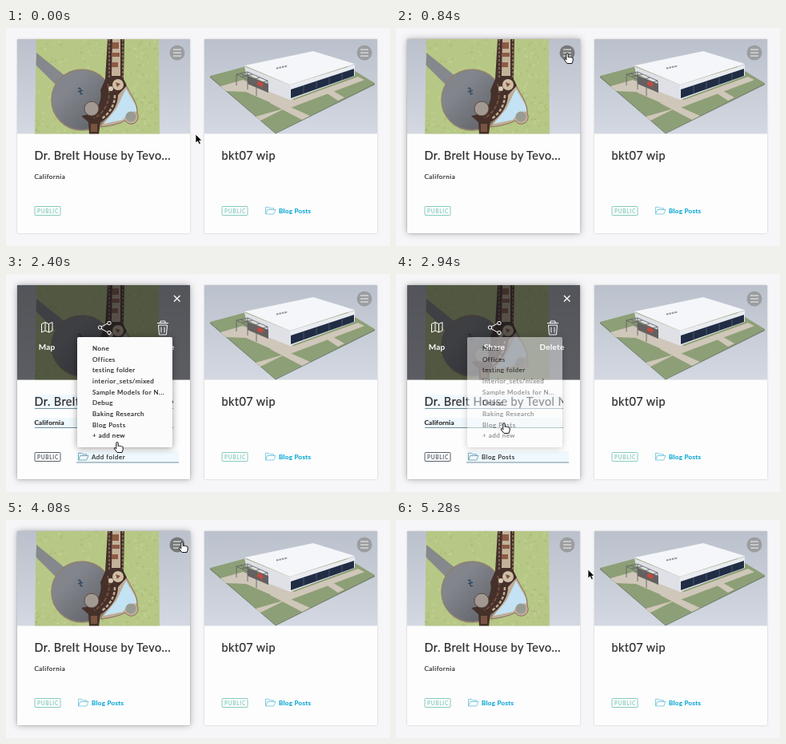
Animation of 480 by 273 pixels, one loop 5.34 s. Source, as an HTML page:

```html
<!DOCTYPE html>
<html lang="en">
<head>
<meta charset="utf-8">
<title>Project cards</title>
<style>
  html, body { margin: 0; width: 100%; height: 100%; overflow: hidden; background: #f6f6f8; }
  svg { display: block; }
  text { font: 8px Lato, "Open Sans", sans-serif; letter-spacing: .5px; fill: #2b2b2d; stroke: #2b2b2d; stroke-width: .2px; white-space: pre; }
  .title { font-size: 14.5px; letter-spacing: .4px; }
  .strong { font-weight: 700; letter-spacing: .3px; }
  .blue { fill: #12a9d6; stroke: #12a9d6; }
  .action { font-size: 10px; font-weight: 700; letter-spacing: .2px; fill: #fff; stroke: none; text-anchor: middle; }
  .tag text { font-size: 6.5px; font-weight: 700; letter-spacing: .7px; fill: currentColor; stroke: none; }
  .line { fill: none; stroke: currentColor; stroke-width: 1; }
  .card { fill: #fdfdfd; filter: drop-shadow(0 .5px 1px rgba(0,0,0,.2)); }
  .lift { fill: #fdfdfd; filter: drop-shadow(0 0 4.5px rgba(0,0,0,.3)); }
  .popup { fill: #fbfbfc; filter: drop-shadow(0 1px 4px rgba(0,0,0,.4)); }
  .field { fill: #eff8fd; }
</style>
</head>
<body>
<svg width="480" height="273" viewBox="0 0 480 273">
  <defs>
    <linearGradient id="sky" x2="0" y2="1">
      <stop stop-color="#bbc1cc"/><stop offset="1" stop-color="#d3d8e2"/>
    </linearGradient>
    <linearGradient id="slate" x2="1" y2="1">
      <stop offset=".3" stop-color="#82868c"/><stop offset=".8" stop-color="#65676d"/>
    </linearGradient>
    <clipPath id="lawn"><path d="M38 14H191L192 132.500H36Z"/></clipPath>
    <g id="folder" class="line" stroke-linejoin="round">
      <path d="M.5 9.500V.8H4.500L5.800 2.300H10.500V4M.5 9.500L2.800 4H13L10.700 9.500Z" stroke-width=".8"/>
    </g>
    <g id="tag" class="tag">
      <rect class="line" x=".5" y=".5" width="32" height="11" rx="1"/>
      <text x="3.500" y="8.500">PUBLIC</text>
    </g>
    <path id="bars" d="M-5-4H5M-5 0H5M-5 4H5" stroke="#f4f4f4" stroke-width="1.100"/>
  </defs>

  <!-- first card -->
  <rect class="card" x="14" y="14" width="216" height="243" rx="1"/>
  <rect id="lift" class="lift" x="14" y="14" width="216" height="243" rx="1"/>
  <rect x="14" y="14" width="216" height="118.500" fill="url(#sky)"/>
  <g clip-path="url(#lawn)">
    <rect x="36" y="14" width="156" height="119" fill="#b7c785"/>
    <g id="grass"></g>
    <path d="M38 31L74 60 62 71 37 46Z" fill="#85888c"/>
    <!-- pool and its terrace -->
    <path d="M136 80L151 73C157 86 165 94 164 107A8 8 0 1 1 149 116Q138 122 118 124L128 104Z" fill="#c0ad98" stroke="#836f60"/>
    <path d="M150 76C156 88 164 96 163 105 154 102 148 113 146 115L122 120 138 101Z" fill="#c3e2f3"/>
    <circle cx="156" cy="111" r="6.500" fill="#989b91"/>
    <!-- round court -->
    <circle cx="95" cy="90" r="38" fill="url(#slate)" stroke="#8f7f70" stroke-width="1.500"/>
    <path d="M90 76q3-2 3 1t3 1M90 80q3-2 3 1t3 1" fill="none" stroke="#2f4763" stroke-width="1.500"/>
    <!-- house -->
    <path d="M127 14H148L147 64 151 72 140 84C140 98 130 112 118 118L116 133H104L103 118 94 110C112 108 121 94 118 78L124 64Z" fill="#45302a"/>
    <path d="M133 14H143V60H132Z" fill="#c3b29a"/>
    <path d="M133 18h8v8h-8zM133 31h9v5h-9zM132 43h8v6h-8z" fill="#8e5a44"/>
    <path d="M129 14V62M146 14V62" stroke="#a88a70" stroke-width="1.200" stroke-dasharray="3 2"/>
    <path d="M127 70C133 88 124 106 110 113" fill="none" stroke="#72513f" stroke-width="2" stroke-dasharray="5 2"/>
    <path d="M136 84C136 98 128 108 119 114" fill="none" stroke="#c1ab92" stroke-width="2.500" stroke-dasharray="4 2"/>
    <circle cx="140" cy="71" r="7" fill="#cfbea5"/>
    <circle cx="131" cy="76" r="3" fill="#d8cbb6"/>
    <path d="M137 68l6 2-4 4z" fill="#81513c"/>
    <circle cx="107" cy="101" r="9" fill="#a29a92" stroke="#5d4b41"/>
    <path d="M106 120h8v10h-8z" fill="#795441"/>
  </g>
  <g id="view">
    <circle id="menu" cx="214" cy="31" r="9.500"/>
    <use href="#bars" x="214" y="31"/>
    <text class="title" x="35.500" y="165">Dr. Brelt House by Tevo...</text>
    <text x="35.500" y="188.500">California</text>
    <use href="#tag" x="35.500" y="223" color="#86cbbe"/>
    <g id="saved">
      <use href="#folder" x="90" y="223.500" color="#62c0dc"/>
      <text class="strong blue" x="107" y="231.500">Blog Posts</text>
    </g>
  </g>
  <g id="edit">
    <rect x="14" y="14" width="216" height="118.500" fill="#18181c" opacity=".64"/>
    <path d="M210 27l7.500 7.500m0-7.500L210 34.500" stroke="#fff" stroke-width="1.300"/>
    <g class="line" color="#fff" stroke-linejoin="round">
      <path d="M44.500 62.500l4.500-2 4.500 2 4.500-2V71l-4.500 2-4.500-2-4.500 2ZM49 60.500V71M53.500 62.500V73"/>
      <path d="M119 66l8-4M119 68.500l8 4.500"/>
      <circle cx="117.500" cy="67" r="2.200"/><circle cx="129" cy="61.500" r="2.200"/><circle cx="129" cy="73.500" r="2.200"/>
      <path d="M189 61.500H203M193 61V59H199V61M190.500 64L191.500 76H200.500L201.500 64ZM194 66.500V73.500M198 66.500V73.500"/>
    </g>
    <text class="action" x="51" y="95">Map</text>
    <text class="action" x="123" y="95">Share</text>
    <text class="action" x="195" y="95">Delete</text>
    <path class="field" d="M36 151H209V168H36ZM36 180H209V192H36ZM88 222H216V236H88Z"/>
    <path class="line" color="#6f8f9b" d="M36 168.500H209M36 192.500H209M88 236H216"/>
    <svg width="209" height="273"><text class="title" x="35.500" y="165">Dr. Brelt House by Tevol N</text></svg>
    <text class="strong" x="35.500" y="188.500">California</text>
    <use href="#tag" x="35.500" y="223" color="#56606b"/>
    <use href="#folder" x="90" y="223.500" color="#5f95a8"/>
    <text id="choice" x="107" y="231.500"></text>
  </g>
  <g id="popup">
    <rect class="popup" x="89" y="79" width="119" height="138" rx="2"/>
  </g>

  <!-- second card -->
  <rect class="card" x="248" y="14" width="216" height="243" rx="1"/>
  <rect x="248" y="14" width="216" height="118.500" fill="url(#sky)"/>
  <path d="M255 60L300 48 420 44 461 69 337 131Z" fill="#8d9f76"/>
  <path d="M255 60L337 131 461 69V71L337 132.500 255 62Z" fill="#76856a"/>
  <g fill="#cfc7b9">
    <path d="M268 73L296 65 360 90 440 61 448 65 350 102 300 80 275 79Z"/>
    <path d="M330 94L340 92 380 110 370 115ZM397 79L404 76 423 87 415 91ZM340 103L350 100 318 116 312 111Z"/>
  </g>
  <path d="M298 48L355 71V90L327 79V70L300 57Z" fill="#dfe1e6"/>
  <path d="M302 60L328 70V81L302 70Z" fill="#65605f"/>
  <path d="M355 71L436 46V60L355 90Z" fill="#e9ebef"/>
  <path d="M356 77L435 51V60L356 88Z" fill="#202d44"/>
  <path d="M372 72V82M388 67V77M404 62V71M420 57V65" stroke="#4f5e77" stroke-width=".8"/>
  <path d="M298 47L384 29 436 45 355 71Z" fill="#f5f6f9"/>
  <path d="M338 50.500l14-3" stroke="#8b929c" stroke-width="2" stroke-dasharray="2.500 1"/>
  <path d="M288 58L302 55 327 66 313 70ZM288 58V72M302 55V77M313 70V85M327 66V81M293 57l25 12M295 61l13-3M304 66l13-4" fill="none" stroke="#64646a" stroke-width=".9"/>
  <path d="M315 66l7 4-2 4-6-3z" fill="#c9483e"/>
  <circle cx="448" cy="31" r="9.500" fill="#9c9da0"/>
  <use href="#bars" x="448" y="31"/>
  <text class="title" x="269.500" y="165">bkt07 wip</text>
  <use href="#tag" x="269.500" y="223" color="#86cbbe"/>
  <use href="#folder" x="324" y="223.500" color="#62c0dc"/>
  <text class="strong blue" x="341" y="231.500">Blog Posts</text>

  <path id="cursor" stroke-linejoin="round"/>
</svg>
<script>
const LOOP = 5340, STEP = 60;
const $ = id => document.getElementById(id);
const NS = "http://www.w3.org/2000/svg";
const ARROW = "M0 0V11L2.600 8.700 4.400 12.600 6.400 11.700 4.700 8H8Z";
const HAND = "M-1.200 6.500V.8a1.200 1.200 0 0 1 2.400 0V4.500q1.200-.8 2.200.2 1.200-.7 2 .3 1.700-.4 1.800 1.200V9L6 12.500H0L-3.600 8q-.3-1.600 1-1.500L-1.200 8Z";

function add(parent, tag, attrs, text = "") {
  const el = document.createElementNS(NS, tag);
  for (const k in attrs) el.setAttribute(k, attrs[k]);
  el.textContent = text;
  parent.append(el);
}

let seed = 7;
const random = () => (seed = seed * 16807 % 2147483647) / 2147483647;
for (let i = 0; i < 420; i++) {
  add($("grass"), "circle", {
    cx: 36 + random() * 156, cy: 14 + random() * 119, r: .5 + random() * 1.3,
    fill: i % 2 ? "#a0b56d" : "#cbd8a0", opacity: .45
  });
}

["None", "Offices", "testing folder", "interior_sets/mixed", "Sample Models for N...",
 "Debug", "Baking Research", "Blog Posts", "+ add new"]
  .forEach((name, i) => add($("popup"), "text", { x: 108, y: 95.8 + i * 13.7 }, name));

// time, x, y of the pointer tip
const PATH = [
  [0, 237, 133], [60, 237, 133], [240, 224, 112], [720, 214, 32], [1080, 214, 32],
  [1560, 152, 201], [1680, 152, 201], [1860, 138, 227], [2280, 138, 227],
  [2400, 139, 211], [2640, 135, 187], [3060, 135, 187], [3420, 233, 124],
  [3540, 233, 124], [3780, 214, 30], [3960, 214, 30], [4080, 220, 28],
  [4260, 240, 42], [4620, 241, 62], [5340, 240, 62]
];

function pointer(t) {
  const i = PATH.findIndex(p => p[0] > t);
  const [t0, x0, y0] = PATH[i - 1], [t1, x1, y1] = PATH[i];
  const u = (t - t0) / (t1 - t0), e = u * u * (3 - 2 * u);
  return [x0 + (x1 - x0) * e, y0 + (y1 - y0) * e];
}

const ramp = (t, from, to) => Math.min(1, Math.max(0, (t - from) / (to - from)));
const pulse = (t, a, b, c, d) => ramp(t, a, b) - ramp(t, c, d);
const fade = (id, value) => $(id).setAttribute("opacity", value);

function draw(now) {
  const t = Math.floor(now % LOOP / STEP) * STEP;
  const [x, y] = pointer(t);
  const inside = x < 230;
  const editing = pulse(t, 900, 1080, 3840, 4020);

  fade("lift", pulse(t, 180, 420, 3480, 3660) + pulse(t, 3600, 3780, 4140, 4380));
  fade("view", 1 - editing);
  fade("edit", editing);
  fade("popup", pulse(t, 1920, 2040, 2880, 3000));
  fade("saved", t > 3000 ? 1 : 0);
  $("choice").textContent = t < 2880 ? "Add folder" : "Blog Posts";
  $("menu").setAttribute("fill", Math.hypot(x - 214, y - 31) < 10 ? "#77787a" : "#9c9da0");

  const cursor = $("cursor");
  cursor.setAttribute("d", inside ? HAND : ARROW);
  cursor.setAttribute("fill", inside ? "#fff" : "#000");
  cursor.setAttribute("stroke", inside ? "#111" : "#fff");
  cursor.setAttribute("stroke-width", inside ? 1 : .8);
  cursor.setAttribute("transform", `translate(${x} ${y})`);
  requestAnimationFrame(frame);
}

const start = performance.now();
const frame = () => draw(performance.now() - start);
frame();
</script>
</body>
</html>
```
